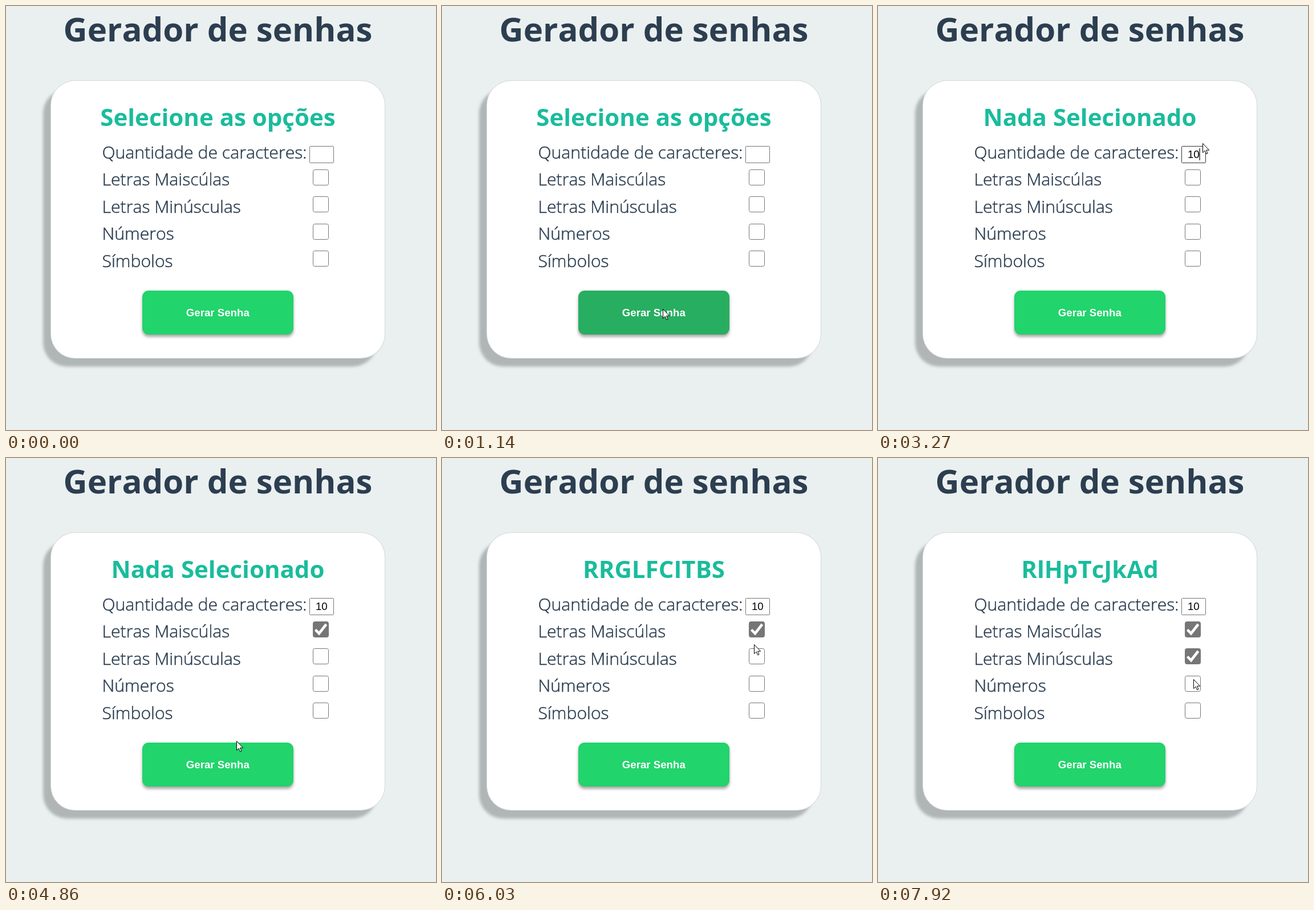
An HTML page for the animation above (8000 ms loop, 754x742 px).

```html
<!DOCTYPE html>
<html lang="pt-BR">
<head>
<meta charset="utf-8">
<title>Gerador de senhas</title>
<style>
  html, body { margin: 0; width: 100%; height: 100%; overflow: hidden; background: #eaf0f0; }
  .stage { position: relative; width: 754px; height: 742px; overflow: hidden; }
  .card {
    position: absolute; left: 79px; top: 131px; width: 585px; height: 485px;
    border-radius: 42px; background: #fff;
    box-shadow: 0 0 0 1px #d3d8d8, -14px 15px 5px #b0b5b5;
  }
  .button {
    position: absolute; left: 239px; top: 498px; width: 264.6px; height: 77px;
    border-radius: 11px; background: #21d46b; color: #fff;
    box-shadow: 0 4px 5px rgba(60, 40, 50, .42);
    font: bold 18.67px/77px "Liberation Sans", Arial, sans-serif; text-align: center;
  }
  .button.hover { background: #27ae60; }
  .button.pressed { transform: translate(1.4px, 1.4px); }
  svg { position: absolute; left: 0; top: 0; }
  text { font-family: "Open Sans", sans-serif; font-kerning: none; fill: #2c3e50; }
  .heading { font-size: 58.1px; font-weight: 700; text-anchor: middle; }
  .result { font-size: 42px; font-weight: 700; text-anchor: middle; fill: #1abc9c; }
  .label { font-size: 30.2px; font-weight: 300; stroke: #2c3e50; stroke-width: .5; }
  .amount { font: 18.67px "Liberation Sans", Arial, sans-serif; fill: #000; text-anchor: middle; }
  .box { fill: #fff; stroke: #767676; }
  .checked .box { fill: #767676; }
  .tick { fill: none; stroke: #fff; stroke-width: 4.5; visibility: hidden; }
  .checked .tick { visibility: visible; }
  .focused { stroke: #333; }
</style>
</head>
<body>
<div class="stage">
  <div class="card"></div>
  <div class="button" id="button">Gerar Senha</div>
  <svg width="754" height="742" viewBox="0 0 754 742">
    <text class="heading" x="371.5" y="62">Gerador de senhas</text>
    <text class="result" id="result" x="371.5" y="210"></text>
    <text class="label" x="168.5" y="266.5">Quantidade de caracteres:</text>
    <rect class="box" id="input" x="532.5" y="245.5" width="42" height="29" rx="1"/>
    <text class="amount" id="amount" x="553.3" y="266"></text>
    <rect id="caret" y="249" width="1.2" height="21"/>
    <g id="options"></g>
    <path id="arrow" d="M.5 .5V16.6L4.2 13.2L6.7 18.8L9 17.8L6.6 12.2H11.6Z" fill="#fff" stroke="#000"/>
    <path id="beam" d="M-3 -8.5H-1L0 -7.5L1 -8.5H3M0 -7.5V7.5M-3 8.5H-1L0 7.5L1 8.5H3" fill="none" stroke="#000"/>
  </svg>
</div>
<script>
const LOOP = 8000, STEP = 30, BLINK = 500, PRESS = 120, BOW = 0.07;
const el = id => document.getElementById(id);

// Pointer moves: from time, to time, destination
const entry = [742, 56];
const moves = [
  [210, 480, 546, 156],
  [480, 960, 533, 330],
  [960, 1140, 387, 530],
  [1650, 2100, 554, 262],
  [2280, 2550, 569, 240],
  [3600, 4320, 560, 303],
  [4530, 4860, 404, 495],
  [5010, 5130, 394, 526],
  [5430, 5820, 573, 364],
  [5820, 6030, 547, 326],
  [6030, 6210, 549, 343],
  [6480, 6750, 403, 510],
  [7140, 7530, 609, 385],
  [7530, 7920, 553, 387]
];
const results = [
  [0, 'Selecione as opções'], [1440, 'Nada Selecionado'],
  [5310, 'RRGLFCITBS'], [6990, 'RlHpTcJkAd']
];
const amounts = [[0, ''], [3090, '1'], [3270, '10']];
const focusStart = 2220, focusEnd = 4470;
const options = [
  ['Letras Maiscúlas', 4470], ['Letras Minúsculas', 6330],
  ['Números', Infinity], ['Símbolos', Infinity]
];

el('options').innerHTML = options.map(([label], i) => {
  const y = 286.5 + Math.floor(i * 47.5);
  return `<g><text class="label" x="168.5" y="${314 + i * 47.5}">${label}</text>
    <rect class="box" x="538.5" y="${y}" width="27" height="27" rx="3"/>
    <path class="tick" d="M542.5 ${y + 14}l6.5 6.5l12.5 -16"/></g>`;
}).join('');
const rows = [...el('options').children];

const latest = (list, t) => list.filter(([start]) => start <= t).pop();
const show = (node, on) => node.style.visibility = on ? 'visible' : 'hidden';
const smooth = k => k * k * (3 - 2 * k);

// Each move eases along an arc that bows to the lower right.
function pointerAt(t) {
  const move = latest(moves, t);
  if (!move) return null;
  const [start, end, x, y] = move;
  const previous = moves[moves.indexOf(move) - 1];
  const [fromX, fromY] = previous ? previous.slice(2) : entry;
  const k = smooth(Math.min(1, (t - start) / (end - start)));
  const bow = BOW * Math.hypot(x - fromX, y - fromY) * Math.sin(Math.PI * k);
  return [fromX + (x - fromX) * k + bow, fromY + (y - fromY) * k + bow].map(Math.round);
}

function within([x, y], left, top, right, bottom) {
  return x >= left && x <= right && y >= top && y <= bottom;
}

function render(t) {
  const pointer = pointerAt(t);
  const overInput = pointer && within(pointer, 532, 245, 574, 274);
  const overButton = pointer && within(pointer, 239, 498, 503, 575);
  show(el('arrow'), pointer && !overInput);
  show(el('beam'), overInput);
  if (pointer) {
    el(overInput ? 'beam' : 'arrow').setAttribute('transform', `translate(${pointer})`);
  }

  const pressed = results.some(([release]) => t >= release - PRESS && t < release);
  el('button').classList.toggle('hover', !!overButton);
  el('button').classList.toggle('pressed', pressed);
  el('result').textContent = latest(results, t)[1];
  rows.forEach((row, i) => row.classList.toggle('checked', t >= options[i][1]));

  const [typedAt, amount] = latest(amounts, t);
  const focused = t >= focusStart && t < focusEnd;
  const blinkTime = t - Math.max(typedAt, focusStart);
  el('amount').textContent = amount;
  el('input').classList.toggle('focused', focused);
  el('caret').setAttribute('x', 553 + amount.length * 5.2);
  show(el('caret'), focused && Math.floor(blinkTime / BLINK) % 2 === 0);
}

function tick() {
  const t = performance.now() % LOOP;
  render(Math.floor(t / STEP) * STEP);
  requestAnimationFrame(tick);
}
tick();
</script>
</body>
</html>
```
